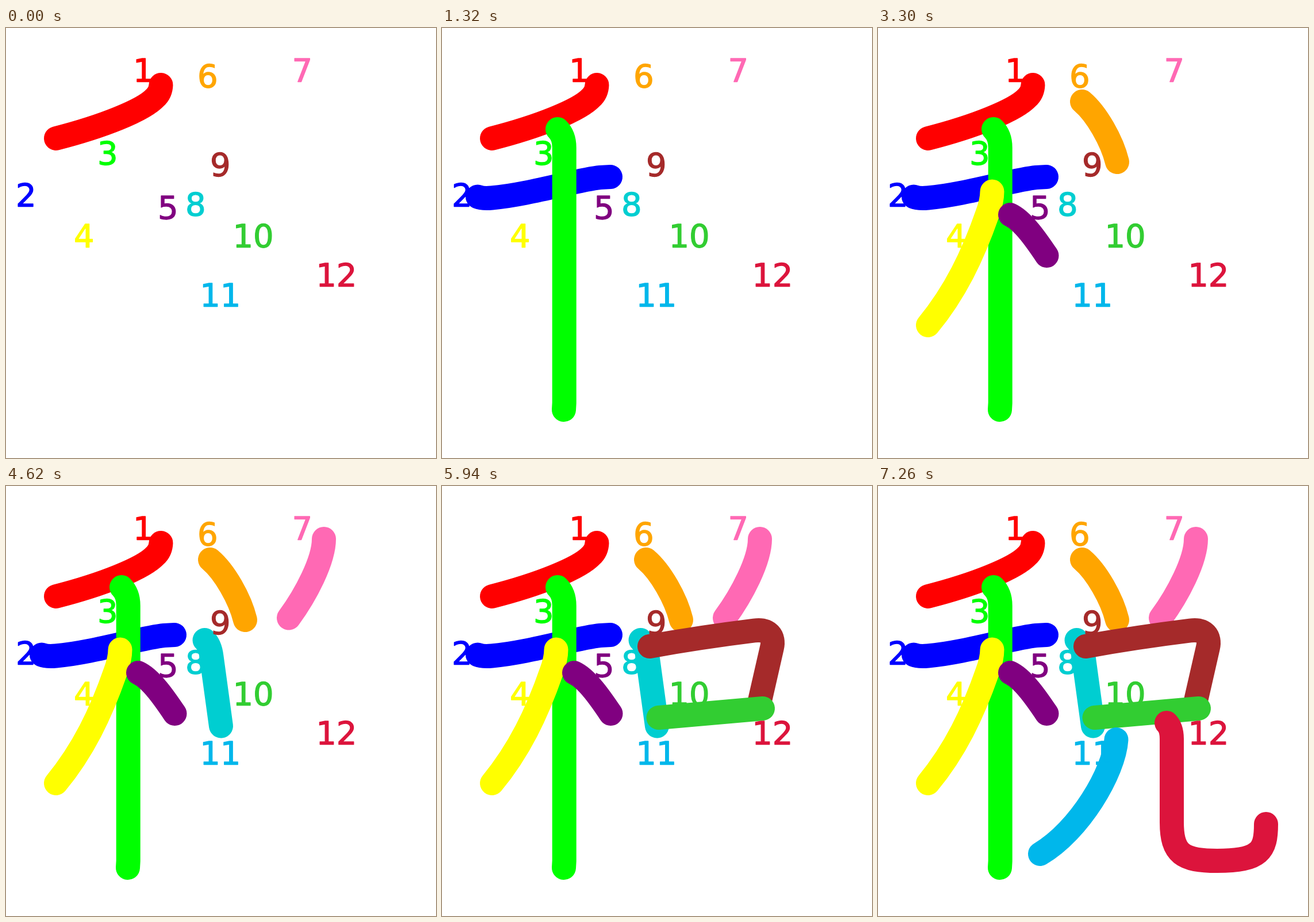
These frames come from a looping animation (748 px wide and 748 px high, 7920 ms). An HTML page with a canvas:

```html
<!DOCTYPE html>
<html lang="en">
<head>
<meta charset="utf-8">
<title>Stroke order</title>
<style>
html, body { margin: 0; width: 100%; height: 100%; overflow: hidden; background: #fff; }
canvas { display: block; width: 748px; height: 748px; }
</style>
</head>
<body>
<canvas id="stage" width="748" height="748"></canvas>
<script>
const STEP = 660;
const ctx = document.getElementById('stage').getContext('2d');

// colour, label x, label baseline, stroke path
const strokes = [
  ['#ff0000', 221, 93.4, 'M269.5 99C269.2 108 265 116 259.5 121C239 143 169 171 87 192'],
  ['#0000ff', 17, 309.6, 'M62 293.5C68 296 77 296.5 87 295.5C150 290 240 263 275 260L293 259'],
  ['#00ff00', 159, 236.6, 'M201 176C209 184 212.7 194 212.7 208V652L212 664'],
  ['#ffff00', 118, 381.4, 'M198.5 284.5C198.5 296 195.5 309 190.5 322.5C165 396 134 460 87 517'],
  ['#800080', 264, 332.4, 'M230 325C252 335 276 370 293.5 396'],
  ['#ffa500', 333, 103.4, 'M355 128C380 149 407 196 416 233'],
  ['#ff69b4', 497.6, 93.4, 'M553 92C553 130 521 190 492 229.5'],
  ['#00ced1', 312, 325.6, 'M345.5 268C353 275 356 284 357.5 297L374 417.5'],
  ['#a52a2a', 355, 257.4, 'M361 279Q450 263 543 251.5C568 248 578.5 262 574 281L550.5 384'],
  ['#32cd32', 394.4, 380.6, 'M376.5 403L558 387'],
  ['#00b7eb', 337.2, 483.6, 'M414.5 441C411 498 350 600 282 640'],
  ['#dc143c', 539.2, 449.2, 'M502 412C508 418 511 427 511 440V585C511 640 530 652 590 652C665 652 675 634 675 588']
].map(([color, x, y, d]) => ({ color, x, y, path: new Path2D(d) }));

function draw(count) {
  ctx.fillStyle = '#fff';
  ctx.fillRect(0, 0, 748, 748);
  ctx.lineCap = ctx.lineJoin = 'round';
  ctx.lineWidth = 42;
  for (const s of strokes.slice(0, count)) {
    ctx.strokeStyle = s.color;
    ctx.stroke(s.path);
  }
  // a thin outline gives the digits their heavier weight
  ctx.font = '56px "DejaVu Sans", sans-serif';
  ctx.lineWidth = 1.3;
  strokes.forEach((s, i) => {
    ctx.fillStyle = ctx.strokeStyle = s.color;
    ctx.fillText(i + 1, s.x, s.y);
    ctx.strokeText(i + 1, s.x, s.y);
  });
}

function tick() {
  draw(Math.floor(performance.now() / STEP) % strokes.length + 1);
  requestAnimationFrame(tick);
}
tick();
</script>
</body>
</html>
```
